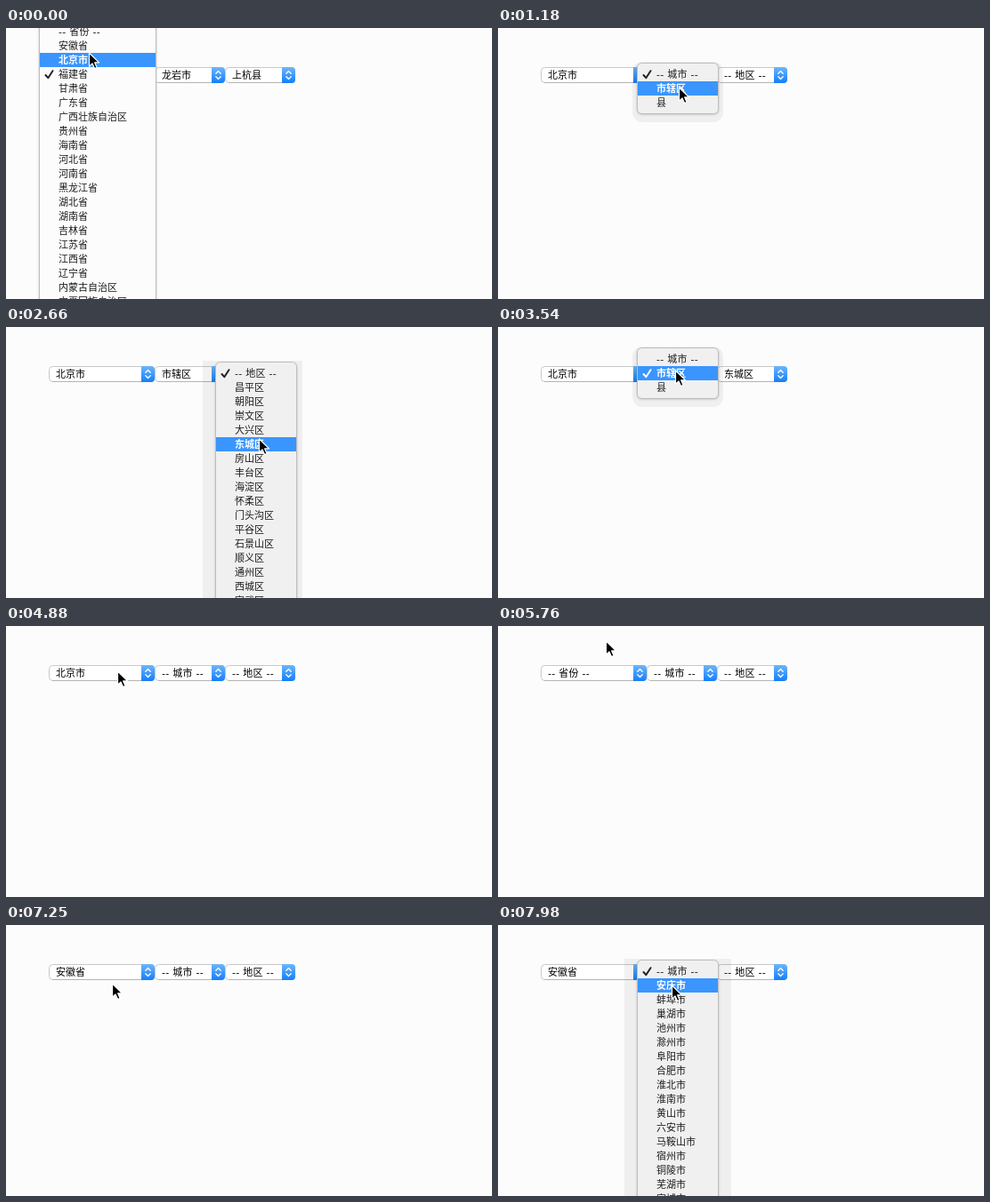
An HTML page for the animation above (8000 ms loop, 546 by 305 pixels).

```html
<!DOCTYPE html>
<html lang="zh-CN">
<head>
<meta charset="utf-8">
<title>省市区联动</title>
<style>
html, body { margin: 0; width: 100%; height: 100%; overflow: hidden; background: #fcfcfc; }
svg { display: block; }
text {
  font: 11px "DejaVu Sans", "Noto Sans CJK SC", "Noto Sans CJK", sans-serif;
  fill: #1c1c1c; white-space: pre;
}
#selects text { fill: #000; }
.dash { letter-spacing: .25px; }
.hot { fill: #fff; font-weight: 700; }
</style>
</head>
<body>
<svg width="546" height="305" viewBox="0 0 546 305">
  <defs>
    <linearGradient id="blue" x2="0" y2="1">
      <stop offset="0" stop-color="#6db6fb"/>
      <stop offset="1" stop-color="#157efa"/>
    </linearGradient>
    <filter id="soft" x="-20%" y="-20%" width="140%" height="140%">
      <feGaussianBlur stdDeviation="1.5"/>
    </filter>
  </defs>
  <g id="selects"></g>
  <g id="menu"></g>
  <path id="cursor" d="M.5 0V15.2L4 11.9L6.5 17.6L9.1 16.5L6.7 10.9H11.5Z"
    fill="#000" stroke="#fff" stroke-width="1.2" stroke-linejoin="round"/>
</svg>
<script>
const LOOP = 8000, TICK = 147.5, ROW = 16;
const P0 = '-- 省份 --', C0 = '-- 城市 --', D0 = '-- 地区 --';

const provinces = (P0 + ',安徽省,北京市,福建省,甘肃省,广东省,广西壮族自治区,贵州省,海南省,河北省,' +
  '河南省,黑龙江省,湖北省,湖南省,吉林省,江苏省,江西省,辽宁省,内蒙古自治区,宁夏回族自治区,青海省').split(',');
const capital = [C0, '市辖区', '县'];
const anhui = (C0 + ',安庆市,蚌埠市,巢湖市,池州市,滁州市,阜阳市,合肥市,淮北市,淮南市,黄山市,' +
  '六安市,马鞍山市,宿州市,铜陵市,芜湖市,宣城市').split(',');
const districts = (D0 + ',昌平区,朝阳区,崇文区,大兴区,东城区,房山区,丰台区,海淀区,怀柔区,门头沟区,' +
  '平谷区,石景山区,顺义区,通州区,西城区,宣武区').split(',');

const boxes = [{ x: 48, w: 119 }, { x: 167, w: 79 }, { x: 246, w: 79 }];

// In each act the cursor glides to a select, opens its menu and glides on to an item.
// at, open and done are in ticks; box is the index of the opened select.
const acts = [
  { at: 0, open: 0, done: 0, values: ['福建省', '龙岩市', '上杭县'],
    box: 0, items: provinces, via: [93, 28], to: [93, 28] },
  { at: 3, open: 7, done: 8, values: ['北京市', C0, D0],
    box: 1, items: capital, via: [200, 56], to: [203, 67] },
  { at: 11, open: 15, done: 18, values: ['北京市', '市辖区', D0],
    box: 2, items: districts, via: [283, 54], to: [284, 126] },
  { at: 20, open: 24, done: 27, values: ['北京市', '市辖区', '东城区'],
    box: 1, items: capital, via: [199, 49], to: [197, 34] },
  { at: 29, open: 34, done: 38, values: ['北京市', C0, D0],
    box: 0, items: provinces, via: [124, 51], to: [121, 17] },
  { at: 39, open: 43, done: 47, values: [P0, C0, D0],
    box: 0, items: provinces, via: [121, 54], to: [119, 66] },
  { at: 49, open: 53, done: 54, values: ['安徽省', C0, D0],
    box: 1, items: anhui, via: [193, 56], to: [195, 68] }
];

const byId = id => document.getElementById(id);
const clamp = (v, lo, hi) => Math.min(hi, Math.max(lo, v));
const easeOut = p => 1 - (1 - p) ** 3;
const easeInOut = p => p * p * (3 - 2 * p);
const mix = (a, b, p) => a.map((v, i) => v + (b[i] - v) * p);
const progress = (k, from, to) => clamp((k - from) / (to - from || 1), 0, 1);

function label(x, y, str, hot) {
  const cls = (str[0] === '-' ? 'dash ' : '') + (hot ? 'hot' : '');
  return `<text x="${x}" y="${y}" class="${cls}">${str}</text>`;
}

function selectBox({ x, w }, str) {
  const r = x + w, mid = r - 7.5;
  return `<rect x="${x + .5}" y="44.5" width="${w - 1}" height="17" rx="4" fill="#fff" stroke="#c8c8c8"/>
    <path d="M${x + 4} 61.5H${r - 15}" stroke="#b4b4b4"/>
    <path d="M${r - 15} 44H${r - 4}Q${r} 44 ${r} 48V58Q${r} 62 ${r - 4} 62H${r - 15}Z" fill="url(#blue)"/>
    <path d="M${mid - 2.7} 51.2l2.7-2.7l2.7 2.7M${mid - 2.7} 54.8l2.7 2.7l2.7-2.7" fill="none" stroke="#fff"
      stroke-width="1.3" stroke-linecap="round" stroke-linejoin="round"/>` +
    label(x + 8, 57, str);
}

function menuBox({ box, items, values }, cursorY) {
  const x = boxes[box].x - 10, w = boxes[box].w + 11, h = items.length * ROW + 8;
  const checked = items.indexOf(values[box]);
  const top = 40 - checked * ROW; // the checked row lies over the select
  const hover = clamp(Math.floor((cursorY - top - 4) / ROW), 0, items.length - 1);
  const short = items.length < 5, spread = short ? 6 : 15;
  const left = Math.max(31, x - spread), right = Math.min(333, x + w + spread);
  const shade = top < 0 ? '' : `<rect x="${left}" y="${top - 2}" width="${right - left}"
    height="${h + 12}" rx="${short ? 11 : 0}" opacity=".05"/>`;
  const ink = checked === hover ? '#fff' : '#222';

  return shade +
    `<rect x="${x - .5}" y="${top + 1}" width="${w + 1}" height="${h}" rx="5" opacity=".28" filter="url(#soft)"/>
    <rect x="${x - .5}" y="${top - .5}" width="${w + 1}" height="${h + 1}" rx="5"
      fill="${top < 0 ? '#fcfcfc' : '#f0f0f0'}" stroke="#bdbdbd"/>
    <rect x="${x}" y="${top + 4 + hover * ROW}" width="${w}" height="${ROW}" fill="#3a95ff"/>` +
    items.map((str, i) => label(x + 21, top + 16 + i * ROW, str, i === hover)).join('') +
    `<path d="M${x + 6.5} 53l2.8 3.2l5.2-8" fill="none" stroke="${ink}"
      stroke-width="2" stroke-linecap="round" stroke-linejoin="round"/>`;
}

function cursorAt(k, n) {
  const { at, open, done, via, to } = acts[n];
  if (k >= open) return mix(via, to, easeInOut(progress(k, open, done)));
  return mix(acts[n - 1].to, via, easeOut(progress(k, at, open)));
}

let shown;
function draw(time) {
  const k = Math.floor(time % LOOP / TICK);
  if (k === shown) return;
  shown = k;
  const n = acts.findLastIndex(a => a.at <= k), act = acts[n];
  const [x, y] = cursorAt(k, n).map(Math.round);
  byId('selects').innerHTML = boxes.map((box, i) => selectBox(box, act.values[i])).join('');
  byId('menu').innerHTML = k >= act.open ? menuBox(act, y) : '';
  byId('cursor').setAttribute('transform', `translate(${x} ${y})`);
}

const start = performance.now();
function tick() {
  draw(performance.now() - start);
  requestAnimationFrame(tick);
}
tick();
</script>
</body>
</html>
```
